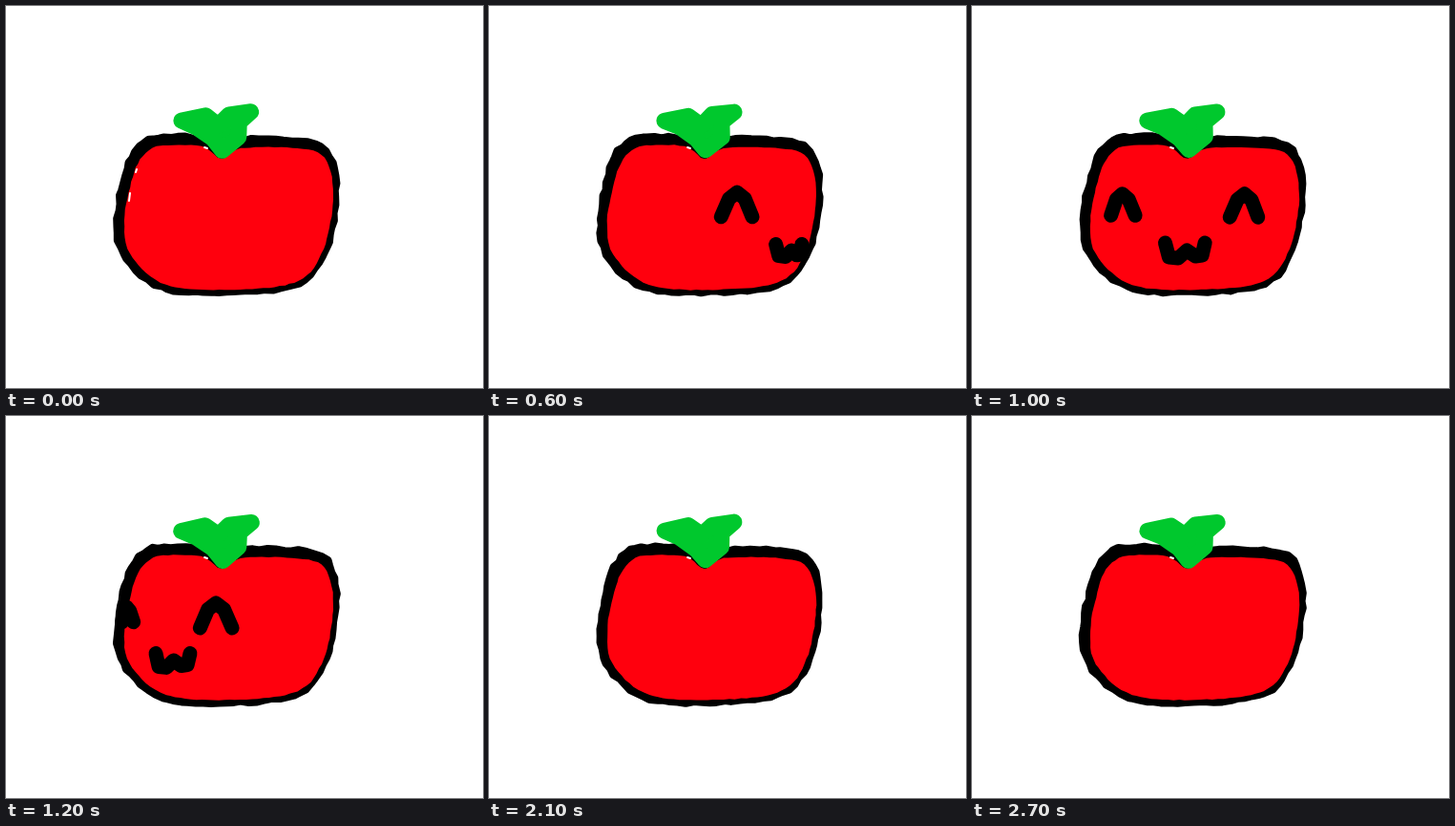
An HTML page that plays this animation: 500x400 px, repeating every 2.8 s.

```html
<!DOCTYPE html>
<html lang="en">
<head>
<meta charset="utf-8">
<title>Tomato</title>
<style>
html, body { margin: 0; width: 100%; height: 100%; overflow: hidden; background: #fff; }
svg { display: block; width: 500px; height: 400px; }
</style>
</head>
<body>
<svg viewBox="0 0 500 400" fill="none" stroke-linecap="round" stroke-linejoin="round">
  <path id="rim" fill="#000" stroke="#000" stroke-width="10"/>
  <path id="flesh" fill="#ff000d"/>
  <path id="gaps" stroke="#fff" stroke-width="2"/>
  <g id="face" stroke="#000" stroke-width="15">
    <path/><path/><path/>
  </g>
  <path id="leaf" fill="#00c82d" stroke="#00c82d" stroke-width="17"/>
</svg>
<script>
const LOOP = 2800, STEP = 100;
const CX = 231, RADIUS = 112, RAD = Math.PI / 180;
const $ = id => document.getElementById(id);
const pairs = s => s.split(' ').map(p => p.split(',').map(Number));

// Points along a smooth closed curve through the key points
function sample(keys, gap) {
  const at = i => keys[(i + keys.length) % keys.length];
  return keys.flatMap((b, i) => {
    const a = at(i - 1), c = at(i + 1), e = at(i + 2);
    const n = Math.ceil(Math.hypot(c[0] - b[0], c[1] - b[1]) / gap);
    return Array.from({ length: n }, (_, k) => {
      const t = k / n;
      return b.map((v, j) => v + t / 2 * (c[j] - a[j]
        + t * (2 * a[j] - 5 * v + 4 * c[j] - e[j]
        + t * (3 * v - a[j] - 3 * c[j] + e[j]))));
    });
  });
}

const body = pairs('150,151 165,146 205,147 226,160 246,149 305,149 334,159 343,198 333,254 306,288 240,297 168,292 130,260 124,225 130,190 138,165');
const leaf = pairs('184,120 209,115 223,125 234,114 257,111 244,122 244,137 227,151 217,139 200,127');
const flesh = sample(body, 6);
// The rim is the same shape, a little larger up and to the left
const rim = sample(body.map(([x, y]) => [118 + (x - 124) * 1.036, 141 + (y - 148) * 1.057]), 8);

// Offsets from the feature's own centre
const eye = [-1, -0.5, 0, 0.5, 1].map(u => [17 * u, 26 * Math.abs(u) ** 2 - 13]);
const mouth = pairs('-21,-8 -17,7 -7,8 2,0 11,6 18,5 21,-8');
// Each feature turns around the body: angle at step 8, degrees per step
const features = [
  { shape: eye, y: 208, angle: -13, rate: 14 },
  { shape: eye, y: 209, angle: 64, rate: 17.4 },
  { shape: mouth, y: 256, angle: 22.6, rate: 13.3 }
];

function project({ shape, y, angle, rate }, n) {
  const a = (angle - rate * (n - 8)) * RAD;
  if (Math.abs(a) > 70 * RAD) return [];
  const squash = Math.sqrt(Math.cos(a));
  return shape.map(([dx, dy]) => [CX + RADIUS * Math.sin(a + dx / RADIUS), y + dy * squash]);
}

function random(seed) {
  return () => {
    seed = (seed * 16807) % 2147483647;
    return seed / 2147483647 - 0.5;
  };
}

const shake = (pts, amount, rnd) =>
  pts.map(p => p.map(v => v + rnd() * amount));

const line = pts => pts.length ? 'M' + pts.map(p => p.map(v => v.toFixed(2)).join(' ')).join('L') : '';
const set = (el, d) => el.setAttribute('d', d);

function draw(n) {
  const rnd = random(7919 * (n + 3));
  set($('rim'), line(shake(rim, 2.4, rnd)) + 'Z');
  set($('flesh'), line(shake(flesh, 0.8, rnd)) + 'Z');
  set($('leaf'), line(shake(leaf, 1, rnd)) + 'Z');
  set($('gaps'), 'M208 148L211 149' + (n < 5 ? 'M129 204L130 196M136 174L137 171' : ''));
  features.forEach((f, i) => set($('face').children[i], line(project(f, n))));
}

let last = -1;
function tick() {
  const n = Math.floor(performance.now() % LOOP / STEP);
  if (n !== last) draw(last = n);
  requestAnimationFrame(tick);
}
tick();
</script>
</body>
</html>
```
